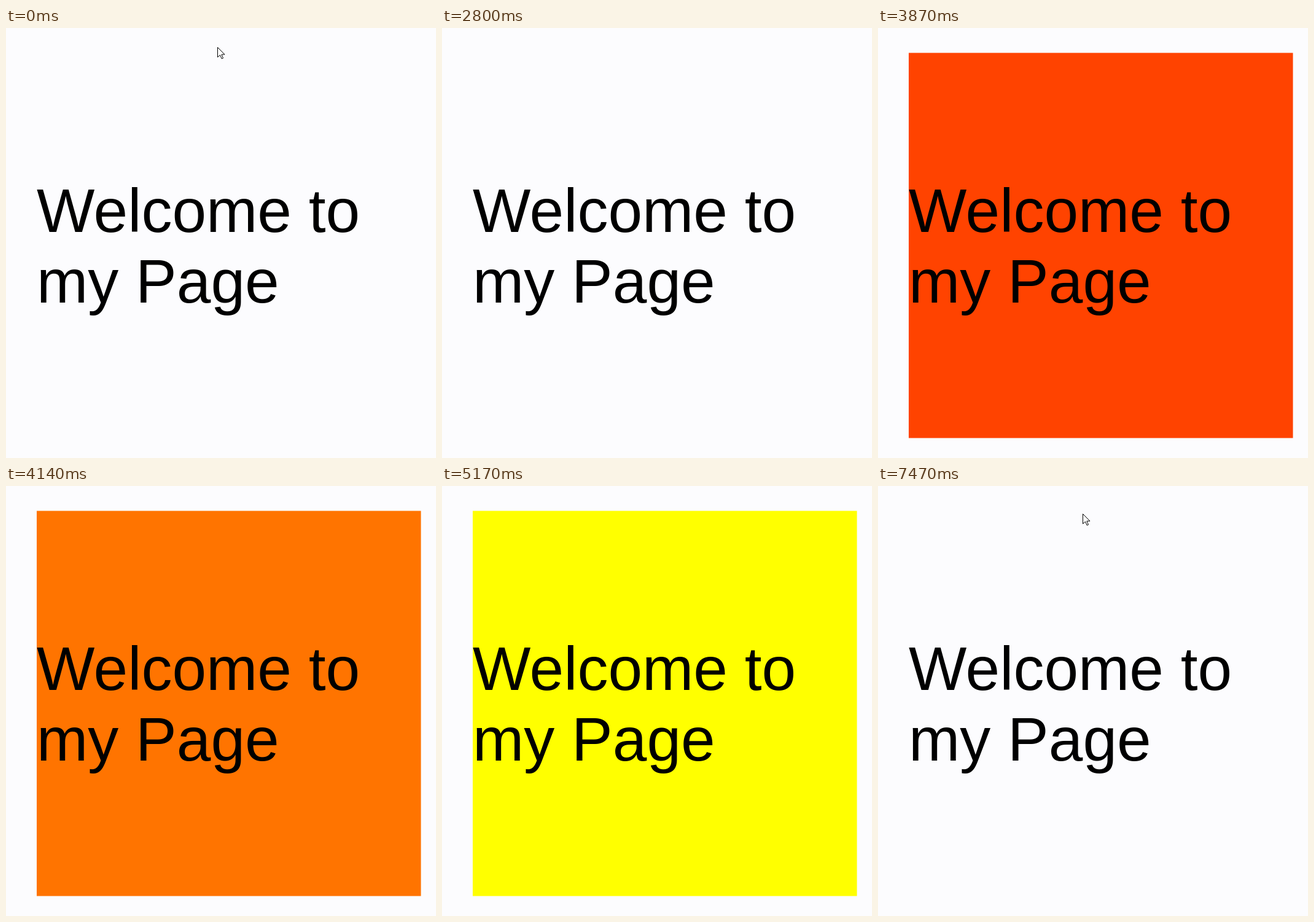
Recreate the animation shown at these times as an HTML page with a canvas. Size 700 px wide and 700 px high, loop 7500 ms.

```html
<!DOCTYPE html>
<html lang="en">
<head>
<meta charset="utf-8">
<title>Welcome</title>
<style>
  html, body { margin: 0; width: 100%; height: 100%; overflow: hidden; background: #fcfcfe; }
  canvas { display: block; }
</style>
</head>
<body>
<canvas id="stage" width="700" height="700"></canvas>
<script>
const ctx = document.getElementById('stage').getContext('2d');
const LOOP = 7500;
const ARROW = new Path2D('M0 0V16L4 12.5L6.7 18.5L9 17.5L6.4 11.6H11.5Z');

const progress = (t, from, to) => Math.min(1, Math.max(0, (t - from) / (to - from)));
const ease = p => p * p * (3 - 2 * p);
const mix = (a, b, p) => a + (b - a) * p;

// The panel appears at once, warms from red to yellow and vanishes at once.
function drawPanel(t) {
  if (t < 3340 || t >= 5570) return;
  const green = Math.round(255 * ease(progress(t, 3200, 5200)));
  ctx.fillStyle = `rgb(255, ${green}, 0)`;
  ctx.fillRect(50, 40.5, 625.5, 627);
}

function drawText() {
  ctx.fillStyle = '#000';
  ctx.font = '100px "Liberation Sans", Arial, sans-serif';
  ctx.fillText('Welcome to', 50, 332);
  ctx.fillText('my Page', 50, 447);
}

function drawArrow(x, y) {
  ctx.save();
  ctx.translate(Math.round(x) + 0.5, Math.round(y) + 0.5);
  ctx.fillStyle = '#fff';
  ctx.strokeStyle = '#000';
  ctx.fill(ARROW);
  ctx.stroke(ARROW);
  ctx.restore();
}

// The pointer sways near the top, glides down and leaves, then returns from above.
function drawPointer(t) {
  if (t < 2040) {
    const sway = 27 * Math.sin(Math.PI * progress(t, 0, 800));
    const p = ease(progress(t, 800, 1800));
    drawArrow(mix(344, 362, p), mix(31, 618, p) + sway);
  } else if (t >= 6910 && t < 7210) {
    const p = progress(t, 6910, 7040);
    drawArrow(mix(629, 341, p), mix(0, -20, p));
  } else if (t >= 7210) {
    const p = progress(t, 7210, 7470);
    drawArrow(mix(341, 333, p), mix(-16, 45, p));
  }
}

const origin = performance.now();

function frame() {
  const t = (performance.now() - origin) % LOOP;
  ctx.fillStyle = '#fcfcfe';
  ctx.fillRect(0, 0, 700, 700);
  drawPanel(t);
  drawText();
  drawPointer(t);
  requestAnimationFrame(frame);
}
frame();
</script>
</body>
</html>
```
